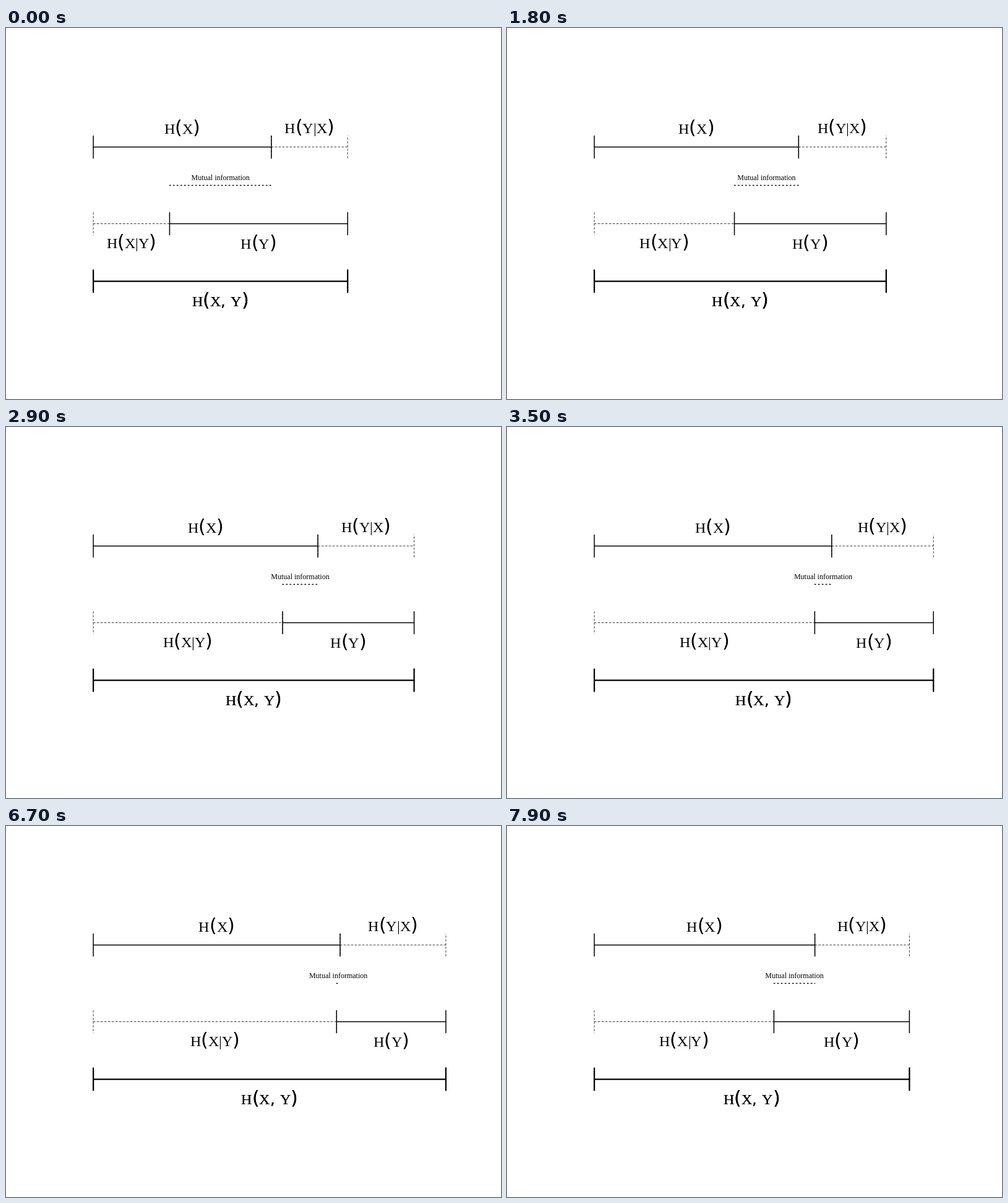
Animation of 800x600 px, one loop 8 s. Source, as an HTML page with a canvas:

```html
<!DOCTYPE html>
<html lang="en">
<head>
<meta charset="utf-8">
<title>Joint entropy</title>
<style>
  html, body { margin: 0; width: 100%; height: 100%; overflow: hidden; background: #fff; }
  canvas { display: block; }
</style>
</head>
<body>
<canvas id="stage" width="800" height="600"></canvas>
<script>
const ctx = document.getElementById('stage').getContext('2d');

const LOOP = 8000, STEP = 100;
const LAST = 40;            // step at which X and Y become independent
const RETURN = 6700;        // time at which the overlap starts to grow again
const LEFT = 141.1, SPAN = 575.5;
const THIN = 0.75, MEDIUM = 1.5, THICK = 2.25;
const CAP = 18;
const DASH = [3, 3], DOTS = [1.5, 4.5];

const SERIF = '"Liberation Serif", "Times New Roman", serif';
const SANS = '"DejaVu Sans", sans-serif';
// Space before and after math symbols
const GAPS = { ',': [0, 2.4], '=': [5.9, 5.9], '+': [4.7, 4.7] };

ctx.lineCap = ctx.lineJoin = 'round';
ctx.fontKerning = 'none';

function line(points, width, dash = []) {
  ctx.lineWidth = width;
  ctx.setLineDash(dash);
  ctx.beginPath();
  for (const [x, y] of points) ctx.lineTo(x, y);
  ctx.stroke();
}

// Horizontal bar with a cap at both ends
function bar(x0, x1, y, width, dash) {
  const reach = CAP + 0.01;
  line([[x0, y], [x1, y]], width, dash);
  line([[x0, y - CAP], [x0, y + reach]], width, dash);
  line([[x1, y + CAP], [x1, y - reach]], width, dash);
}

function fontFor(ch) {
  if ('()'.includes(ch)) return '30px ' + SANS;
  return '24px ' + (ch in GAPS ? SANS : SERIF);
}

// Math label centred on x, one glyph at a time
function formula(text, x, baseline) {
  let pos = 0;
  const glyphs = [...text].map(ch => {
    const [before, after] = GAPS[ch] || [0, 0];
    const font = ctx.font = fontFor(ch);
    const at = pos + before;
    pos = at + ctx.measureText(ch).width + after;
    return { ch, font, at };
  });
  ctx.textAlign = 'left';
  for (const g of glyphs) {
    ctx.font = g.font;
    ctx.fillText(g.ch, Math.round(x - pos / 2 + g.at), baseline);
  }
}

function caption(text, size, x, baseline) {
  ctx.font = size + 'px ' + SERIF;
  ctx.textAlign = 'center';
  ctx.fillText(text, x, baseline);
}

function stepAt(t) {
  return t < RETURN
    ? Math.min(LAST, Math.floor(t / STEP))
    : LAST - 1 - Math.floor((t - RETURN) / STEP);
}

function draw(t) {
  const step = stepAt(t);
  const shared = (LAST - step) / 100;
  const total = SPAN / (1 + shared);
  const right = LEFT + total;
  const xEnd = LEFT + 0.7 * total;
  const yStart = LEFT + (0.7 - shared) * total;
  const mid = (a, b) => (a + b) / 2;

  ctx.fillStyle = '#fff';
  ctx.fillRect(0, 0, 800, 600);
  ctx.fillStyle = ctx.strokeStyle = '#000';

  bar(LEFT, xEnd, 192.4, MEDIUM);
  bar(xEnd, right, 192.4, THIN, DASH);
  bar(yStart, right, 316.5, MEDIUM);
  bar(LEFT, yStart, 316.5, THIN, DASH);
  bar(LEFT, right, 409.5, THICK);

  formula('H(X)', mid(LEFT, xEnd), 171);
  formula('H(Y|X)', mid(xEnd, right), 170);
  formula('H(Y)', mid(yStart, right), 357);
  formula('H(X|Y)', mid(LEFT, yStart), 356);

  const centre = mid(LEFT, right);
  if (step < LAST) {
    line([[yStart, 254.4], [xEnd, 254.4]], MEDIUM, DOTS);
    caption('Mutual information', 12, mid(yStart, xEnd), 246);
    // Painted twice for a slightly heavier look
    formula('H(X, Y)', centre, 450);
    formula('H(X, Y)', centre, 450);
  } else {
    formula('H(X, Y)=H(X)+H(Y)', centre, 450);
    caption('Variables are independent', 24, centre, 476);
  }
}

function frame() {
  draw(performance.now() % LOOP);
  requestAnimationFrame(frame);
}
frame();
</script>
</body>
</html>
```
